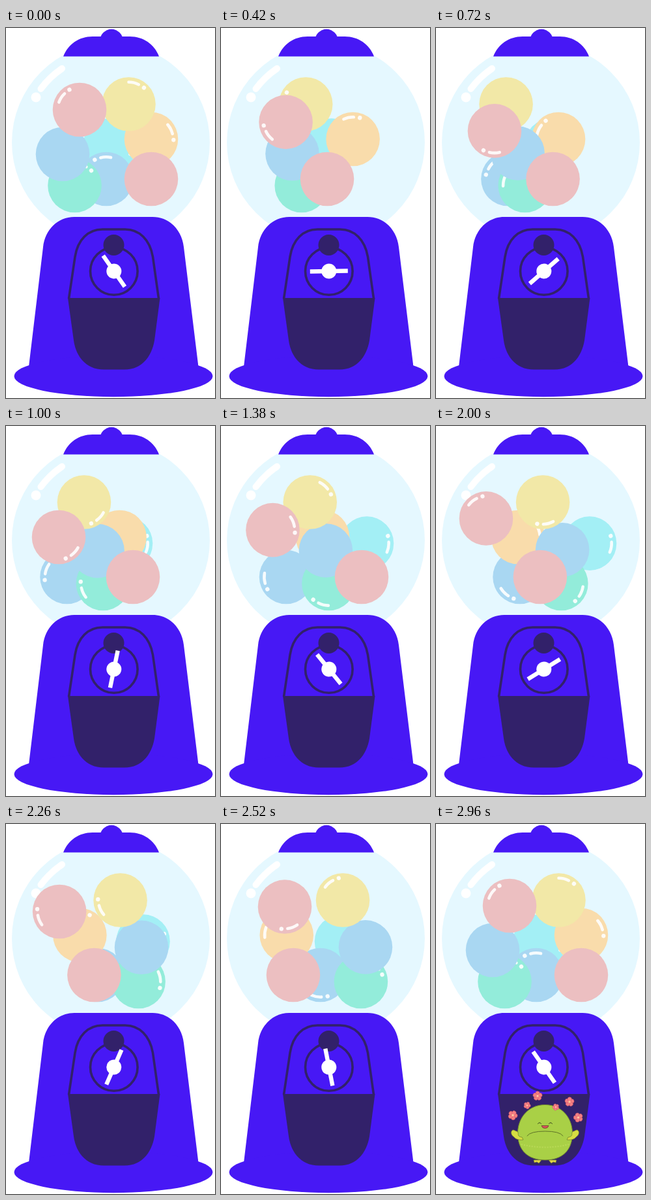
These frames come from a looping animation (321x566 px, 2980 ms). An HTML page:

```html
<!DOCTYPE html>
<html>
<head>
<meta charset="utf-8">
<style>
html, body { margin: 0; width: 100%; height: 100%; overflow: hidden; background: #fff; }
svg { display: block; width: 100vw; height: 100vh; }
</style>
</head>
<body>
<svg viewBox="0 0 321 566">
  <defs>
    <g id="shine">
      <circle cx="34.3" r="3.2" fill="#fff"/>
      <path d="M32.4 -9.3A33.7 33.7 0 0 0 24.6 -23" fill="none" stroke="#fff" stroke-width="4.6" stroke-linecap="round"/>
    </g>
    <g id="flower"></g>
    <g id="arm">
      <path d="M134 483C128 484 122 482 120 479C115 476 114 470 118 468C121 468 122 470 124 470C128 472 125 475 127 477C129 479 131 479 132 479Z" fill="#d5dd42" stroke="#76852f" stroke-width=".8"/>
    </g>
    <path id="foot" d="M150 514L151 518L155 517L158 519L162 514Z" fill="#e5d843" stroke="#76852f" stroke-width=".7"/>
  </defs>

  <circle cx="161" cy="175" r="152" fill="#e5f8ff"/>
  <path d="M53.5 93A135 135 0 0 1 86 62" fill="none" stroke="#fff" stroke-width="10" stroke-linecap="round"/>
  <circle cx="46" cy="106" r="7.5" fill="#fff"/>
  <g id="balls"></g>

  <g fill="#4718f5">
    <rect x="80" width="165" height="43" fill="#fff"/>
    <circle cx="162" cy="19.5" r="17.7"/>
    <path d="M88 43.5C95 25 112 13 133 13H190C211 13 228 25 235 43.5Z"/>
    <path d="M35 518L57 335C60 309 79 289 105 289H225C251 289 270 309 273 335L295.500 518Z"/>
    <ellipse cx="165" cy="532.5" rx="152.500" ry="31.700"/>
  </g>
  <g fill="none" stroke="#32216a" stroke-width="3.6">
    <path d="M96.500 414L106 350C110 324 126 308 148 308H183C205 308 221 324 225.500 350L234.500 414"/>
    <circle cx="165.800" cy="372" r="36.300"/>
  </g>
  <g fill="#32216a">
    <circle cx="165.500" cy="332" r="16"/>
    <path d="M95 413H236.500L228 478C223 506 206 522.500 182 522.500H150C126 522.500 108 506 104 478Z"/>
  </g>
  <g id="dial" fill="#fff">
    <rect x="-29" y="-3.200" width="58" height="6.400"/>
    <circle r="11.500"/>
  </g>

  <g id="prize">
    <use href="#foot"/>
    <use href="#foot" transform="matrix(-1 0 0 1 335 0)"/>
    <path d="M167.500 429.500C192 429.500 209 448 209.500 472C210 500 193 514 167.500 514C142 514 125 500 125.500 472C126 448 143 429.500 167.500 429.500Z" fill="#a9d046" stroke="#71862f"/>
    <path d="M131 490Q167 499 204 490" fill="none" stroke="#b9d957" stroke-width="2" stroke-dasharray="2 2"/>
    <use href="#arm"/>
    <use href="#arm" transform="matrix(-1 0 0 1 335 0)"/>
    <g fill="none" stroke="#5f7328" stroke-linecap="round">
      <path d="M140 477Q145 470 167.500 470Q190 470 195 477"/>
      <path d="M156.500 458.500Q159 455 161.500 458.500M173.500 458.500Q176 455 178.500 458.500" stroke="#36421f"/>
    </g>
    <path d="M162 461.500H173Q172 465.500 167.500 465.500Q163 465.500 162 461.500Z" fill="#d9545c" stroke="#5a3524" stroke-width=".7"/>
    <g id="flowers"></g>
  </g>
</svg>
<script>
const LOOP = 2980, STEP = 20, MOVE_END = 2700, RESET = 2820;
const $ = id => document.getElementById(id);

// Tracks are flat lists of time, value, time, value...; plain numbers stay fixed.
// Listed back to front; flip mirrors the shine.
const balls = [
  { color: '#a3eff5', x: [0, 159.5, 1000, 184, 1380, 224, 1620, 234.5, 1900, 242.5, 2000, 236, 2700, 167.4], y: 179.6, turn: -19.5, flip: -1 },
  { color: '#a9d7f2', x: [0, 154, 1103, 87.3, 2700, 160.8], y: 231, turn: [0, -121, 2700, -301], flip: -1 },
  { color: '#f9dcab', x: [0, 223, 2700, 92], y: 170, turn: [0, 2, 2045, -358, 2700, -558] },
  { color: '#93ecda', x: [0, 105.5, 2700, 222.7], y: 241, turn: [0, -42, 2700, -402] },
  { color: '#a9d7f2', x: [0, 87, 2700, 231.6], y: [0, 193, 2700, 188] },
  { color: '#f2e8a7', x: [0, 188.5, 616, 103, 2700, 195], y: 116.5, turn: [0, -47, 1490, -407, 2700, -47] },
  { color: '#ecbfc1', x: [0, 113, 1000, 81, 2165, 76.3, 2700, 109], y: [0, 125, 1000, 170, 2700, 121.4], turn: [0, -117, 2080, -473, 2700, -682] },
  { color: '#ecbfc1', x: [0, 223, 420, 163, 1395, 216.8, 2700, 94], y: 231 }
];

function at(track, t) {
  if (!Array.isArray(track)) return track;
  let i = 0;
  while (i < track.length - 4 && t > track[i + 2]) i += 2;
  const [t0, v0, t1, v1] = track.slice(i, i + 4);
  return v0 + (v1 - v0) * (t - t0) / (t1 - t0);
}

$('balls').innerHTML = balls.map(b => `<g><circle r="41.3" fill="${b.color}"/>` +
  (b.turn === undefined ? '' : '<use href="#shine" opacity=".9"/>') + '</g>').join('');
balls.forEach((b, i) => {
  b.node = $('balls').children[i];
  b.shine = b.node.querySelector('use');
});

$('flower').innerHTML = [0, 72, 144, 216, 288].map(a =>
  `<circle cy="-4" r="3.2" fill="#f47f83" stroke="#c94f62" stroke-width=".5" transform="rotate(${a})"/>`
).join('') + '<circle r="2.6" fill="#f47f83"/><circle r="1.5" fill="#ffd0a0"/>';
$('flowers').innerHTML = [[156, 416, 1], [140, 430.5, .75], [184, 433, .72], [205, 425, 1], [118, 445.5, 1], [218.5, 449, 1]]
  .map(([x, y, s], i) => `<use href="#flower" transform="translate(${x} ${y}) rotate(${i * 25}) scale(${s})"/>`).join('');

function draw(now) {
  const time = Math.floor(now % LOOP / STEP) * STEP;
  const t = time < RESET ? Math.min(time, MOVE_END) : 0;
  for (const b of balls) {
    b.node.setAttribute('transform', `translate(${at(b.x, t)} ${at(b.y, t)})`);
    if (b.shine) b.shine.setAttribute('transform', `rotate(${at(b.turn, t)}) scale(1 ${b.flip || 1})`);
  }
  $('dial').setAttribute('transform', `translate(165.8 372) rotate(${55 - 360 * t / MOVE_END})`);
  $('prize').setAttribute('opacity', Math.max(0, Math.min(1, (time - RESET + STEP) / 120)));
}

const start = performance.now();
function tick() {
  draw(performance.now() - start);
  requestAnimationFrame(tick);
}
tick();
</script>
</body>
</html>
```
